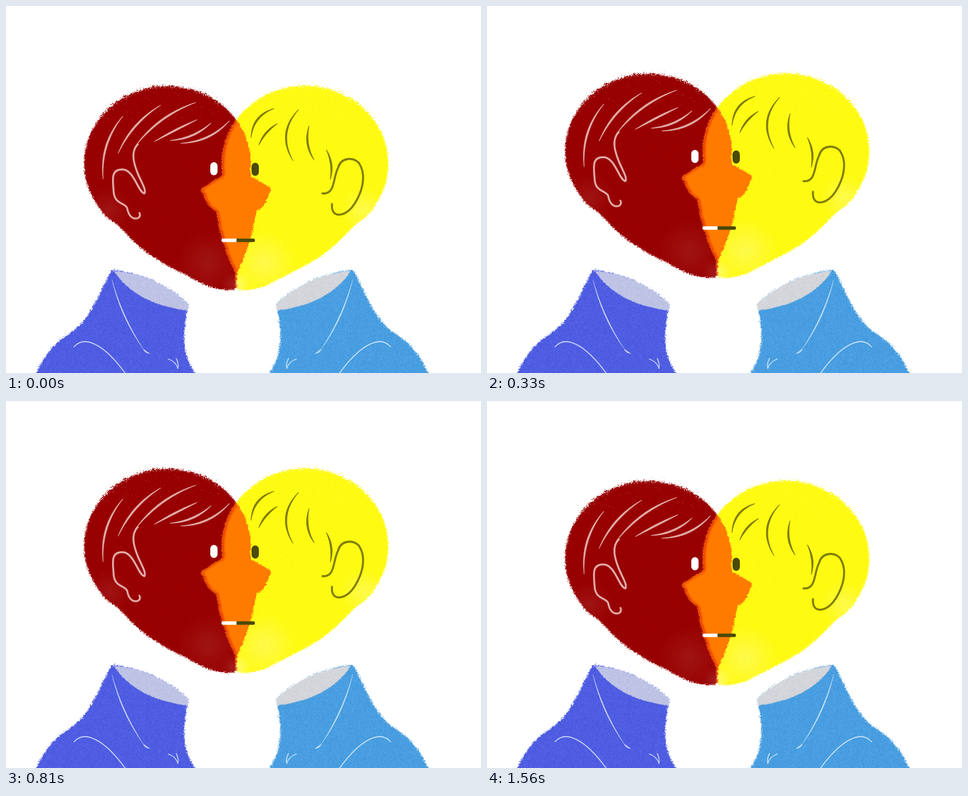
Animation, 851 px wide and 658 px high, one loop 1830 ms. Source, as an HTML page with a canvas:

```html
<!DOCTYPE html>
<html lang="en">
<head>
<meta charset="utf-8">
<title>Two heads</title>
<style>
html, body { margin: 0; width: 100%; height: 100%; overflow: hidden; background: #fff; }
canvas { display: block; }
</style>
</head>
<body>
<canvas id="stage" width="851" height="658"></canvas>
<script>
const W = 851, H = 658, LAYER_H = 700;
const HEAD_MIRROR = 825, BODY_MIRROR = 811;
const CENTER_X = HEAD_MIRROR / 2;
const ctx = document.getElementById('stage').getContext('2d');

function makeLayer() {
  const canvas = document.createElement('canvas');
  canvas.width = W;
  canvas.height = LAYER_H;
  return canvas.getContext('2d');
}

function flip(c, mirror) {
  if (mirror) c.setTransform(-1, 0, 0, 1, mirror, 0);
}

function noise(x, y) {
  let h = Math.imul(x, 374761393) + Math.imul(y, 668265263) | 0;
  h = Math.imul(h ^ h >>> 13, 1274126177);
  return ((h ^ h >>> 16) >>> 0) / 4294967296;
}

// Skull is an ellipse; jaw, chin and nose follow as curves.
function headPath(c) {
  c.ellipse(289, 282, 149, 139, 0, 0.1, Math.PI - 0.57, true);
  c.quadraticCurveTo(174, 378, 200, 392);
  c.bezierCurveTo(232, 427, 255, 451, 320, 481);
  c.bezierCurveTo(350, 497, 375, 514, 413, 508);
  c.lineTo(414, 477);
  c.quadraticCurveTo(440, 425, 448, 365);
  c.bezierCurveTo(464, 364, 464, 348, 476, 329);
  c.quadraticCurveTo(457, 315, 438, 307);
}

function bodyPath(c) {
  c.moveTo(189, 473);
  c.bezierCurveTo(160, 528, 149, 565, 113, 588);
  c.bezierCurveTo(75, 611, 62, 640, 45, 680);
  c.lineTo(352, 680);
  c.bezierCurveTo(318, 630, 312, 605, 327, 534);
  c.quadraticCurveTo(270, 482, 189, 473);
}

function collarPath(c) {
  c.moveTo(193, 475);
  c.quadraticCurveTo(271, 482, 327, 534);
  c.lineTo(326, 546);
  c.quadraticCurveTo(233, 535, 193, 475);
}

// Fills a path as crayon: a blurred edge cut by grain, with grain in the colour.
function chalk(path, { color, mirror, blur = 3, rough = () => 0.6, grain = 0 }) {
  const c = makeLayer();
  flip(c, mirror);
  c.filter = `blur(${blur}px)`;
  c.beginPath();
  path(c);
  c.fill();
  const image = c.getImageData(0, 0, W, LAYER_H), px = image.data;
  for (let y = 0; y < LAYER_H; y++) {
    for (let x = 0; x < W; x++) {
      const i = (y * W + x) * 4, a = px[i + 3] / 255;
      if (!a) continue;
      const n = (noise(x, y) + noise((x >> 1) + 900, y >> 1)) / 2;
      const cut = 0.5 + (n - 0.5) * rough(x, y);
      px[i + 3] = 255 * Math.max(0, Math.min(1, (a - cut) * 3.5 + 0.5));
      const shade = (n - 0.5) * grain;
      color.forEach((v, k) => px[i + k] = v + shade);
    }
  }
  c.putImageData(image, 0, 0);
  return c.canvas;
}

function overlap(a, b, shift, blur, color) {
  const c = makeLayer();
  c.filter = `blur(${blur}px)`;
  c.drawImage(a, shift, 0);
  c.filter = 'none';
  c.globalCompositeOperation = 'destination-in';
  c.drawImage(b, 0, 0);
  c.globalCompositeOperation = 'source-in';
  c.fillStyle = color;
  c.fillRect(0, 0, W, LAYER_H);
  return c.canvas;
}

// Soft spot where the crayon was pressed less hard.
function fade(layer, mirror, x, y, radius, strength) {
  const c = layer.getContext('2d');
  c.save();
  flip(c, mirror);
  c.globalCompositeOperation = 'source-atop';
  const glow = c.createRadialGradient(x, y, 0, x, y, radius);
  glow.addColorStop(0, `rgba(255,255,255,${strength})`);
  glow.addColorStop(1, 'rgba(255,255,255,0)');
  c.fillStyle = glow;
  c.fillRect(x - radius, y - radius, 2 * radius, 2 * radius);
  c.restore();
}

// Returns a pen for tapered arcs: two ends and how far the middle bows out.
function arcPen(c, color, width) {
  return (x0, y0, x1, y1, bow) => {
    const dx = x1 - x0, dy = y1 - y0, len = Math.hypot(dx, dy), steps = 30;
    const at = t => {
      const lift = 4 * bow * t * (1 - t) / len;
      return [x0 + dx * t - dy * lift, y0 + dy * t + dx * lift];
    };
    c.strokeStyle = color;
    c.lineCap = 'round';
    for (let i = 0; i < steps; i++) {
      c.lineWidth = width * (0.3 + 0.7 * Math.sin(Math.PI * (i + 0.5) / steps));
      c.beginPath();
      c.moveTo(...at(i / steps));
      c.lineTo(...at((i + 1) / steps));
      c.stroke();
    }
  };
}

function outline(c, d, color, width) {
  c.strokeStyle = color;
  c.lineWidth = width;
  c.lineCap = c.lineJoin = 'round';
  c.stroke(new Path2D(d));
}

function pill(c, x, y, w, h, color, radii) {
  c.fillStyle = color;
  c.beginPath();
  c.roundRect(x, y, w, h, radii);
  c.fill();
}

function drawBody(c, mirror, cloth, lining, line) {
  c.drawImage(chalk(bodyPath, { color: cloth, mirror, grain: 20 }), 0, 0);
  c.drawImage(chalk(collarPath, { color: lining, mirror, blur: 1.5, grain: 16 }), 0, 0);
  c.save();
  flip(c, mirror);
  const arc = arcPen(c, line, 2.2);
  arc(190, 491, 246, 615, 6);
  arc(246, 615, 257, 623, 1);
  outline(c, 'M122 611C140 590 175 605 214 659', line, 1.9);
  outline(c, 'M291 633Q305 638 308 650Q310 642 305 632', line, 1.7);
  c.restore();
}

function drawHair(c) {
  const light = arcPen(c, '#dfa9a5', 3.6);
  light(209, 198, 174, 310, 12);
  light(277, 178, 201, 264, 9);
  light(340, 173, 232, 251, 10);
  light(342, 204, 266, 243, 1);
  light(367, 210, 294, 241, -7);
  light(400, 206, 313, 246, -10);

  const dark = arcPen(c, '#807d08', 3.6);
  dark(480, 184, 439, 236, 11);
  dark(486, 211, 453, 249, 4);
  dark(524, 186, 514, 277, 17);
  dark(543, 215, 552, 276, 7);
  dark(574, 258, 581, 311, -5);
}

function drawEars(c) {
  outline(c, 'M236 248C222 262 230 285 236 300S252 330 248 336C236 334 230 293 208 293'
    + 'S192 315 193 335C196 356 212 352 217 362C220 380 230 383 237 380Q242 376 239 371', '#e0aaa8', 3.4);
  outline(c, 'M567 336C590 338 585 310 595 290C600 272 620 270 632 281'
    + 'C645 300 640 325 630 345C615 375 597 377 589 372Q583 367 584 355', '#807d08', 3.6);
}

function drawHeads() {
  const c = makeLayer();
  const rough = (x, y) => Math.abs(x - CENTER_X) > 30 && y < 205 ? 0.9 : 0.55;
  const red = chalk(headPath, { color: [152, 0, 0], rough, grain: 8 });
  const yellow = chalk(headPath, { color: [255, 250, 18], mirror: HEAD_MIRROR, rough, grain: 6 });
  for (const [layer, mirror, strength] of [[red, 0, 0.08], [yellow, HEAD_MIRROR, 0.25]]) {
    fade(layer, mirror, 362, 460, 55, strength);
    fade(layer, mirror, 185, 365, 40, strength);
    fade(layer, mirror, 410, 500, 24, strength * 1.5);
    c.drawImage(layer, 0, 0);
  }
  c.drawImage(overlap(yellow, red, 0, 1, '#e81800'), 0, 0);
  c.drawImage(overlap(yellow, red, 3, 1.5, '#ff7b00'), 0, 0);

  drawHair(c);
  drawEars(c);
  pill(c, 366, 280, 13, 23.5, '#fff', 6.5);
  pill(c, 440, 281, 13, 23.5, '#4c4a0a', 6.5);
  pill(c, 386, 417, 27, 6.3, '#fff', [3, 0, 0, 3]);
  pill(c, 413, 417, 33, 6.3, '#4c4a0a', [0, 3, 3, 0]);
  return c.canvas;
}

const bodies = makeLayer();
drawBody(bodies, 0, [78, 93, 225], [190, 195, 229], '#c3cdf8');
drawBody(bodies, BODY_MIRROR, [72, 158, 224], [211, 213, 218], '#c2dff6');
const heads = drawHeads();

// The heads squash for a moment before rising and again before landing.
const LOOP = 1830, RISE = 250, FALL = 1080, SQUASH = 80;

function poseAt(t) {
  const squashedFrom = start => t >= start && t < start + SQUASH;
  if (squashedFrom(RISE)) return { sx: 0.966, sy: 0.923, drop: 9.5 };
  if (squashedFrom(FALL)) return { sx: 0.966, sy: 0.923, drop: 19.5 };
  return { sx: 1, sy: 1, drop: t > RISE && t < FALL ? -22 : 0 };
}

const start = performance.now();

function render() {
  const { sx, sy, drop } = poseAt((performance.now() - start) % LOOP);
  ctx.setTransform(1, 0, 0, 1, 0, 0);
  ctx.fillStyle = '#fff';
  ctx.fillRect(0, 0, W, H);
  ctx.drawImage(bodies.canvas, 0, 0);
  ctx.setTransform(sx, 0, 0, sy, CENTER_X * (1 - sx), drop);
  ctx.drawImage(heads, 0, 0);
  requestAnimationFrame(render);
}
render();
</script>
</body>
</html>
```
